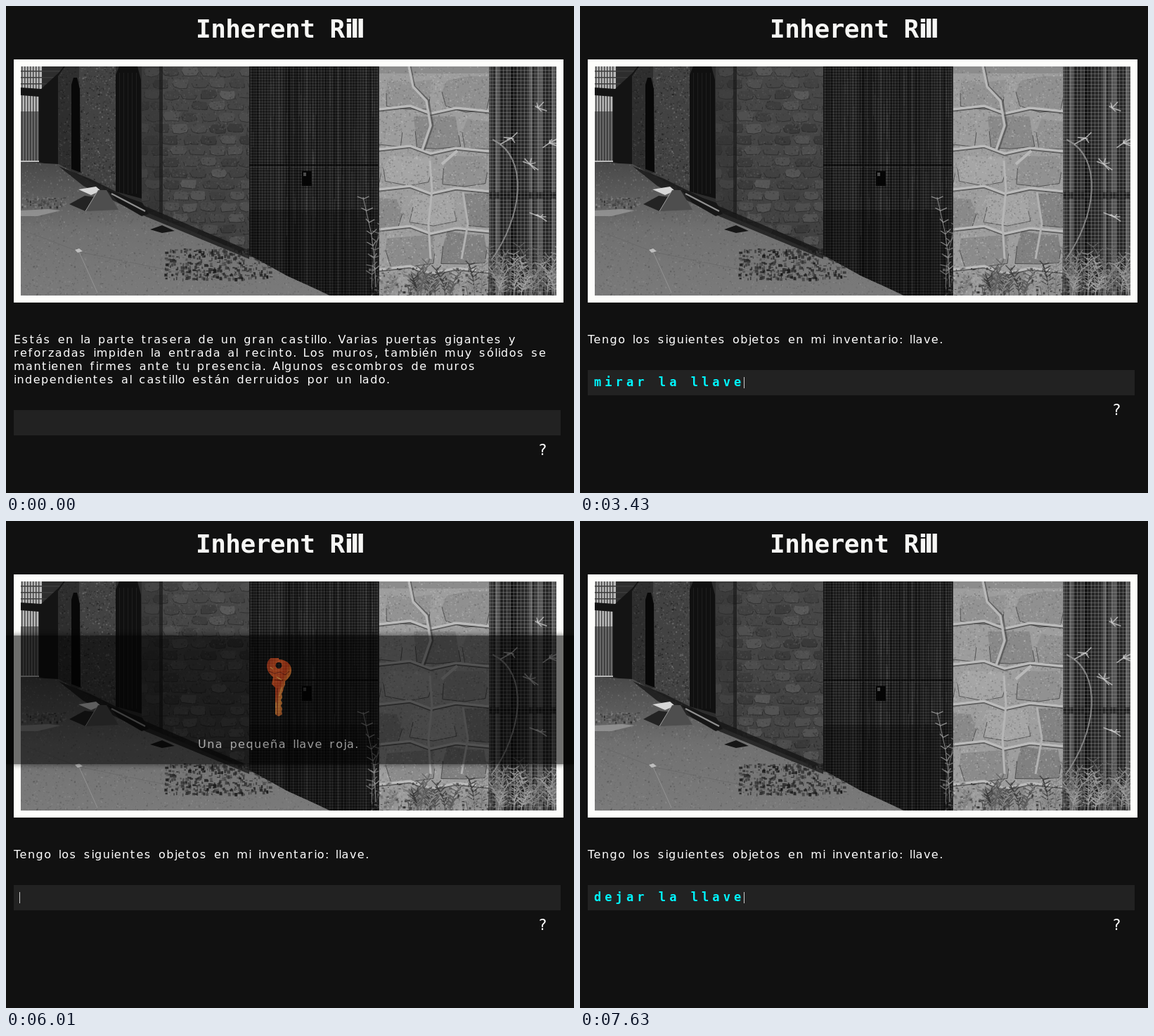
An HTML page with a canvas for the animation above (8 s loop, 808x693 px).

```html
<!DOCTYPE html>
<html lang="es">
<head>
<meta charset="utf-8">
<title>Inherent Rill</title>
<style>
html, body { margin: 0; width: 100%; height: 100%; overflow: hidden; background: #111; }
#stage { position: relative; width: 808px; height: 693px; overflow: hidden; background: #111; color: #fff; }
#stage > *, #panel > *, #popup > * { position: absolute; margin: 0; white-space: pre; }
h1 { left: 270px; top: 13px; font: bold 36px/40px "DejaVu Sans Mono", monospace; letter-spacing: -.5px; color: #f7f7f5; }
h1 span { font-family: "DejaVu Sans", sans-serif; letter-spacing: -4px; }
canvas { left: 11px; top: 76px; border: 10px solid #fdfdfb; }
.prose { font: 16px/19px "DejaVu Sans", sans-serif; letter-spacing: 1.5px; word-spacing: 2.7px; }
.prose .thin { letter-spacing: 0; }
.prose .wide { letter-spacing: 2.5px; }
#place, #items { left: 11px; top: 465px; }
#place { animation: leave 8s step-end infinite; }
#items { animation: arrive 8s step-end infinite; }
#panel { left: 0; top: 575px; width: 808px; height: 80px; animation: lift 8s step-end infinite; }
#bar { left: 11px; top: 0; width: 778px; height: 36px; background: #222; }
#typed { left: 20px; top: -1px; font: bold 17px/36px "DejaVu Sans Mono", monospace; letter-spacing: 5.07px; color: #00f6ff; }
#caret { left: 19px; top: 10px; width: 1px; height: 16px; background: #ccc; }
#help { left: 758px; top: 42px; font: 21px/30px "DejaVu Sans", sans-serif; }
#popup { left: 0; top: 163px; width: 808px; height: 183px; background: #000; box-shadow: 0 0 8px #000; opacity: 0; animation: popup 8s step-end infinite; }
#popup p { left: 273px; top: 145px; }
#popup svg { left: 368px; top: 32px; }
@keyframes leave { 0% { opacity: 1 } 25%, 100% { opacity: 0 } }
@keyframes arrive { 0% { opacity: 0 } 25%, 100% { opacity: 1 } }
@keyframes lift { 0% { transform: none } 25%, 100% { transform: translateY(-57px) } }
@keyframes popup {
  0% { opacity: 0 }
  50.375% { opacity: 1 }
  72.5% { opacity: 1; animation-timing-function: cubic-bezier(.37, 0, .63, 1) }
  78.25%, 100% { opacity: 0 }
}
</style>
</head>
<body>
<div id="stage">
  <h1>Inherent R<span>ill</span></h1>
  <canvas id="photo" width="762" height="326"></canvas>
  <p id="place" class="prose">Estás en la parte trasera de un gran castillo. Varias puertas gigantes y
reforzadas impiden la entrada al recinto. Los muros, también muy sólidos se
mantienen firmes ante tu presencia. Algunos escombros de muros
independientes al castillo están derruidos por un lado.</p>
  <p id="items" class="prose">Tengo los siguientes objetos en mi inventario: llave.</p>
  <div id="panel">
    <div id="bar"></div>
    <div id="typed"></div>
    <div id="caret"></div>
    <div id="help">?</div>
  </div>
  <div id="popup">
    <svg width="42" height="92" viewBox="368 195 42 92">
      <defs>
        <linearGradient id="rust" x1="0" y1="0" x2="1" y2="1">
          <stop offset="0" stop-color="#a82308"/>
          <stop offset=".3" stop-color="#ec5418"/>
          <stop offset=".5" stop-color="#c93209"/>
          <stop offset=".65" stop-color="#f28a2c"/>
          <stop offset="1" stop-color="#9a1c06"/>
        </linearGradient>
      </defs>
      <path fill="url(#rust)" d="M388 197c11 0 18 7 18 15 0 7-4 12-9 16v5l-2 4-1 5-2 4 1 5-2 4 2 4-2 4 2 4-1 4 1 4-5 3-5-3v-38l-5-5 2-10c-5-4-9-9-9-16 0-8 7-15 17-15z"/>
      <circle cx="388" cy="205.5" r="4.5"/>
      <path fill="none" stroke="#7a1604" d="M374 214l8 3 8-2 7 4 6-5M382 226l12 1M386 238v40"/>
      <path fill="none" stroke="#ffa640" stroke-width="1.5" d="M376 208l4 3M385 222l7 4M392 237l-3 12M384 258v8"/>
    </svg>
    <p class="prose">Una pequeña llave roja.</p>
  </div>
</div>
<script>
const $ = id => document.getElementById(id);

// Narrow and broad letters get their own tracking.
for (const el of document.querySelectorAll('.prose'))
  el.innerHTML = el.textContent
    .replace(/[ilj.,:]+|[trsfc]+/g, s => `<span class="${/[ilj.,:]/.test(s) ? 'thin' : 'wide'}">${s}</span>`);

// ---- Photograph ----
const g = $('photo').getContext('2d');
let seed = 7;
const rnd = (a = 1, b = 0) => {
  seed = (seed * 16807) % 2147483647;
  return b + (a - b) * seed / 2147483647;
};
const grey = (v, a = 1) => `rgba(${v | 0},${v | 0},${v | 0},${a})`;
const rect = (x, y, w, h, v, a) => { g.fillStyle = grey(v, a); g.fillRect(x, y, w, h); };

function trace(p) {
  g.beginPath();
  for (let i = 0; i < p.length; i += 2) g.lineTo(p[i], p[i + 1]);
}
function poly(p, v, a) { trace(p); g.fillStyle = grey(v, a); g.fill(); }
function line(p, v, a, w = 1) { trace(p); g.strokeStyle = grey(v, a); g.lineWidth = w; g.stroke(); }
function clipped(p, draw) {
  g.save();
  trace(p);
  g.clip();
  draw();
  g.restore();
}
function grade(x0, y0, x1, y1, ...tones) {
  const s = g.createLinearGradient(x0, y0, x1, y1);
  tones.forEach((v, i) => s.addColorStop(i / (tones.length - 1), grey(v)));
  return s;
}
function specks(x, y, w, h, count, lo, hi, a, size = 2.5) {
  for (let i = 0; i < count; i++)
    rect(x + rnd(w), y + rnd(h), rnd(size, .8), rnd(size, .8), rnd(hi, lo), a);
}
function stones(x, y, w, h, cw, ch, lo, hi, mortar) {
  rect(x, y, w, h, mortar);
  const j = () => rnd(ch * .14);
  for (let r = 0; r * ch < h; r++)
    for (let c = -1; c * cw < w; c++) {
      const l = x + (c + (r % 2) * .45) * cw + rnd(cw * .15), t = y + r * ch + rnd(ch * .12);
      const block = [l + j() + 3, t + j(), l + cw * .5, t + j(), l + cw * .88 - j(), t + j(),
        l + cw * .92 - j(), t + ch * .5, l + cw * .88 - j(), t + ch * .88 - j(),
        l + cw * .45, t + ch * .92 - j(), l + j() + 2, t + ch * .85 - j(), l + j(), t + ch * .4];
      poly(block, rnd(hi, lo));
      line(block.slice(6), 25, .55);
    }
  specks(x, y, w, h, w * h / 16, lo - 45, hi + 40, .4);
}
function mesh(x, y, w, h, step, v, a) {
  for (let i = 0; i < w; i += step) rect(x + i, y, 1, h, v, a);
  for (let i = 0; i < h; i += step) rect(x, y + i, w, 1, v, a);
}
function weed(x, y, h, lean, v) {
  const at = k => [x + lean * k * k, y - h * k];
  line([...at(0), ...at(.3), ...at(.6), ...at(1)], v, .8);
  for (let k = .2; k < 1; k += .13) {
    const [a, b] = at(k);
    line([a - rnd(9, 3), b - rnd(8, 2), a, b, a + rnd(9, 3), b - rnd(8, 2)], v, .75, 1.4);
  }
}

function paintPhoto() {
  g.translate(-21, -86);
  rect(21, 86, 762, 326, 45);

  // yard beyond the corner
  rect(21, 86, 30, 136, 185);
  rect(21, 150, 27, 70, 105);
  for (let i = 0; i < 7; i++) rect(22 + i * 4, 86, 1.5, 134, 35, .75);
  for (let i = 0; i < 4; i++) rect(21, 92 + i * 9, 60, 1.5, 60);
  poly([21, 116, 50, 118, 75, 95, 82, 86, 130, 86, 110, 240, 47, 222, 47, 129, 21, 127], 20);

  // far wall and arches
  clipped([74, 100, 84, 86, 156, 86, 156, 268, 74, 230], () => {
    rect(74, 86, 84, 190, 66);
    specks(74, 86, 84, 190, 1500, 15, 135, .5);
    rect(74, 86, 30, 190, 10, .35);
  });
  poly([93, 112, 96, 102, 101, 102, 105, 118, 106, 237, 93, 232], 8);
  poly([156, 98, 161, 86, 187, 86, 192, 105, 193, 274, 156, 264], 16);
  for (let i = 0; i < 5; i++) rect(161 + i * 6, 95, 1, 172, 40, .6);

  // middle wall
  clipped([193, 86, 346, 86, 346, 360, 193, 295], () => {
    stones(193, 86, 154, 276, 27, 16, 72, 125, 92);
    g.fillStyle = grade(0, 160, 0, 350, 35, 18);
    g.globalAlpha = .38;
    g.fillRect(193, 86, 153, 276);
    g.globalAlpha = 1;
    rect(193, 86, 30, 220, 45, .42);
    rect(218, 86, 5, 210, 12, .45);
  });

  // ground
  const ground = [21, 222, 75, 225, 120, 250, 196, 292, 346, 355, 460, 412, 21, 412];
  trace(ground);
  g.fillStyle = grade(0, 222, 0, 412, 72, 92, 112, 118, 122);
  g.fill();
  clipped(ground, () => {
    specks(21, 222, 440, 190, 4200, 55, 170, .3);
    line([104, 350, 130, 408], 165, .6);
    line([21, 318, 105, 350, 300, 390], 85, .3);
  });
  poly([75, 228, 120, 246, 196, 284, 346, 348, 346, 360, 200, 300, 110, 256], 18, .75);
  specks(225, 345, 150, 43, 420, 15, 80, .75, 5);
  specks(22, 272, 60, 14, 130, 25, 150, .65, 4);
  poly([21, 291, 60, 289, 78, 291, 45, 299, 21, 299], 160, .7);

  // rubble
  poly([90, 282, 112, 270, 130, 272, 113, 292], 35);
  poly([103, 261, 128, 257, 135, 263, 121, 269], 215);
  poly([113, 292, 131, 262, 143, 262, 160, 290], 78);
  line([113, 292, 131, 262], 185, .8);
  poly([146, 263, 194, 280, 203, 296, 193, 299, 160, 280], 22);
  line([150, 267, 198, 292], 175, .8, 2);
  poly([205, 318, 222, 312, 240, 320, 222, 323], 22);
  poly([98, 347, 104, 345, 109, 349, 102, 351], 190);

  // metal gate
  clipped([346, 86, 531, 86, 531, 412, 462, 412, 400, 384, 346, 354], () => {
    rect(346, 86, 186, 326, 38);
    for (let x = 346; x < 530; x += 5) rect(x, 86, rnd(4, 1), 326, rnd(70, 12), .55);
    for (let i = 0; i < 70; i++) rect(350 + rnd(176), 90 + rnd(220), 1, rnd(60, 15), 130, .22);
    rect(346, 225, 186, 3, 12, .8);
    rect(346, 229, 186, 1, 85, .5);
    rect(402, 86, 3, 326, 10, .65);
    rect(454, 86, 4, 326, 10, .5);
    mesh(346, 86, 186, 326, 4, 5, .42);
    mesh(348, 88, 186, 326, 4, 110, .13);
    rect(346, 290, 186, 122, 0, .25);
  });
  rect(421, 235, 14, 21, 5);
  rect(423, 237, 4, 5, 75);

  // bright wall
  clipped([530, 86, 690, 86, 686, 412, 530, 412], () => {
    stones(530, 95, 160, 320, 80, 56, 128, 170, 158);
    rect(530, 86, 160, 10, 140);
    specks(530, 86, 160, 326, 1500, 70, 225, .35);
    for (let y = 148; y < 400; y += 57) {
      line([530, y, 575, y - 5, 604, y + 6, 640, y - 2, 690, y + 3], 40, .55, 5);
      line([530, y - 1, 575, y - 6, 604, y + 5, 640, y - 3, 690, y + 2], 188, 1, 3.5);
    }
    line([574, 86, 580, 115, 600, 135, 606, 170, 594, 205], 55, .5, 5);
    line([573, 86, 579, 115, 598, 135, 604, 170, 592, 205], 185, 1, 3.5);
    line([603, 220, 606, 262, 601, 310, 604, 360], 182, 1, 3);
    line([620, 225, 642, 206], 185, 1, 4);
    line([650, 265, 657, 310, 648, 360], 178, 1, 3);
  });
  rect(529, 86, 2, 326, 15, .7);

  // fence
  rect(687, 86, 96, 326, 40);
  for (let x = 688; x < 783; x += 8) rect(x, 86, rnd(6, 2), 326, rnd(125, 15), .6);
  rect(718, 86, 7, 326, 12, .75);
  rect(755, 86, 6, 326, 120, .5);
  rect(687, 265, 96, 9, 20, .7);
  mesh(687, 86, 96, 326, 5, 175, .34);
  g.beginPath();
  g.moveTo(692, 190);
  g.bezierCurveTo(745, 215, 735, 300, 690, 362);
  g.strokeStyle = grey(150, .8);
  g.stroke();
  for (const [x, y] of [[757, 145], [719, 188], [745, 225], [773, 195], [760, 300]])
    for (let i = 0; i < 6; i++)
      line([x, y, x + rnd(16, -16), y + rnd(9, -9)], 205, .75, 1.6);

  // weeds
  specks(515, 372, 268, 40, 500, 12, 165, .6, 4);
  for (let i = 0; i < 26; i++) weed(686 + rnd(96), 412, rnd(75, 25), rnd(35, -30), rnd(190, 105));
  for (let i = 0; i < 18; i++) weed(530 + rnd(155), 412, rnd(48, 15), rnd(18, -18), rnd(150, 45));
  weed(526, 400, 128, -18, 165);
  weed(520, 400, 90, 14, 130);
}
paintPhoto();

// ---- Typing: [text, start, ms per key], wiped at the end of each command ----
const commands = [
  { from: 0, to: 2000, keys: [['inventario', 1094, 54]] },
  { from: 2000, to: 4030, keys: [['mirar ', 2555, 55], ['la lla', 2980, 54], ['ve', 3400, 30]] },
  { from: 4030, to: 8000, keys: [['dejar', 6310, 67], [' la ', 6730, 110], ['llave', 7270, 90]] }
];
const caretOn = [[500, 710], [1040, 2500], [2555, 4330], [4630, 4960], [5260, 5590], [5860, 6110], [6310, 8000]];
const pitch = 15.3;
let start;

function tick(now) {
  start ??= now;
  const t = Math.max(0, now - start) % 8000;
  const { keys } = commands.find(c => t >= c.from && t < c.to);
  const text = keys.map(([s, at, ms]) => s.slice(0, Math.max(0, Math.floor((t - at) / ms) + 1))).join('');
  $('typed').textContent = text;
  $('caret').style.left = Math.floor(19 + text.length * pitch) + 'px';
  $('caret').style.opacity = caretOn.some(([a, b]) => t >= a && t < b) ? 1 : 0;
  requestAnimationFrame(tick);
}
requestAnimationFrame(tick);
</script>
</body>
</html>
```
